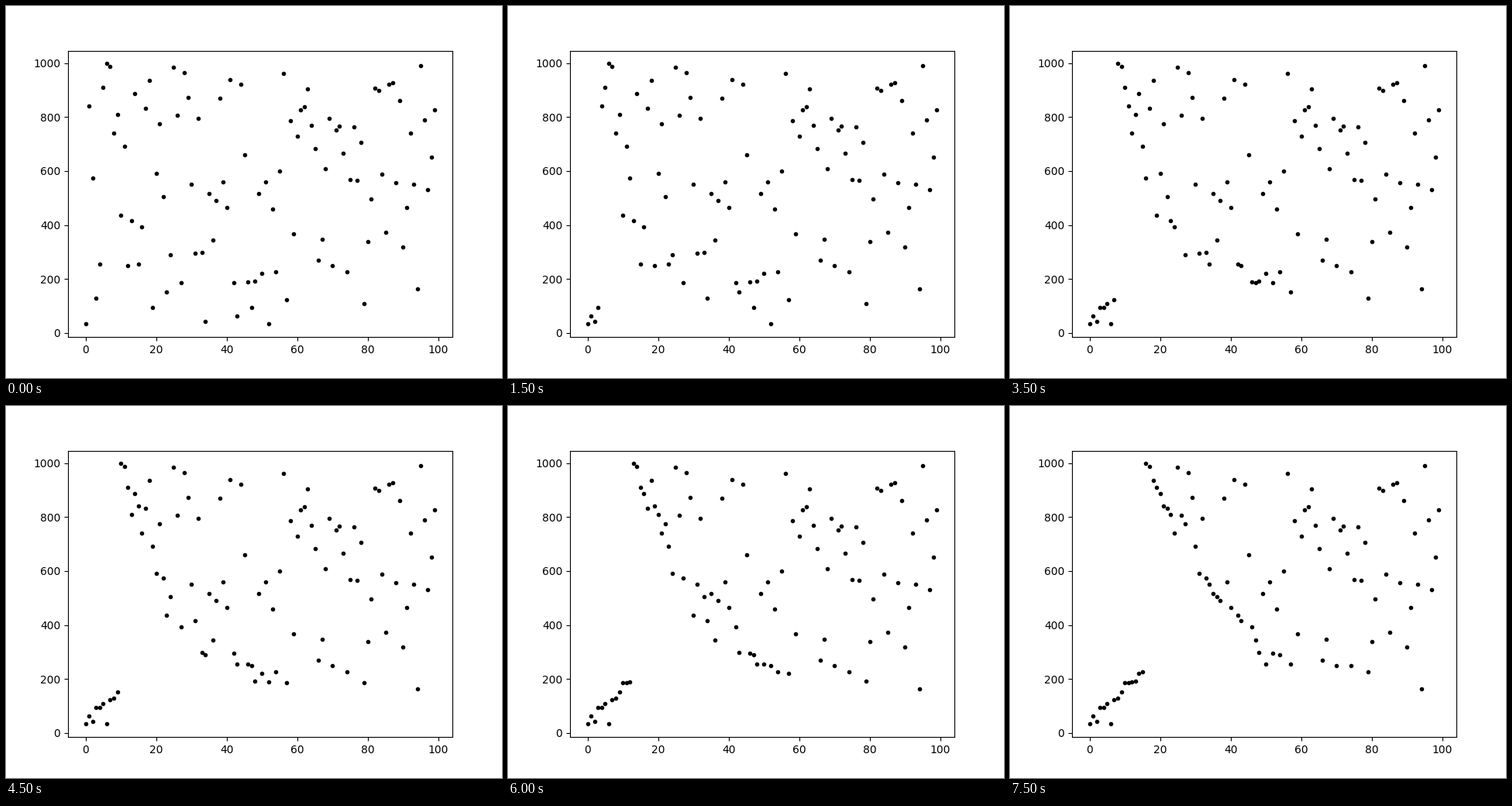
A matplotlib script that plays this animation: 640 by 480 pixels, repeating every 8000 ms.

```python
import matplotlib.pyplot as plt
from matplotlib.animation import FuncAnimation

VALUES = [
    33, 840, 575, 128, 254, 909, 998, 987, 740, 811,
    435, 691, 249, 415, 886, 254, 392, 832, 935, 94,
    590, 774, 504, 151, 289, 984, 808, 185, 964, 872,
    550, 295, 794, 297, 42, 518, 343, 490, 869, 559,
    464, 938, 185, 62, 921, 659, 188, 94, 191, 516,
    220, 559, 33, 458, 226, 599, 961, 122, 786, 366,
    728, 826, 837, 903, 768, 682, 269, 346, 608, 794,
    249, 751, 766, 665, 226, 567, 763, 565, 705, 108,
    338, 496, 906, 900, 588, 372, 923, 926, 556, 860,
    318, 464, 740, 550, 163, 990, 789, 530, 651, 826,
]
STEPS = 16


def sort_pass(data, i):
    """One selection pass that swaps on every comparison, not just at the end."""
    a = list(data)
    low = i
    for j in range(i + 1, len(a)):
        if a[j] < a[low]:
            low = j
        a[i], a[low] = a[low], a[i]
    return a


states = [VALUES]
for i in range(1, STEPS):
    states.append(sort_pass(states[-1], i))

fig, ax = plt.subplots(figsize=(6.4, 4.8), dpi=100)
dots, = ax.plot(range(len(VALUES)), VALUES, "k.")


def update(step):
    dots.set_ydata(states[step])
    return dots,


anim = FuncAnimation(fig, update, frames=STEPS, interval=500,
                     repeat=True, repeat_delay=0)
plt.show()
```
